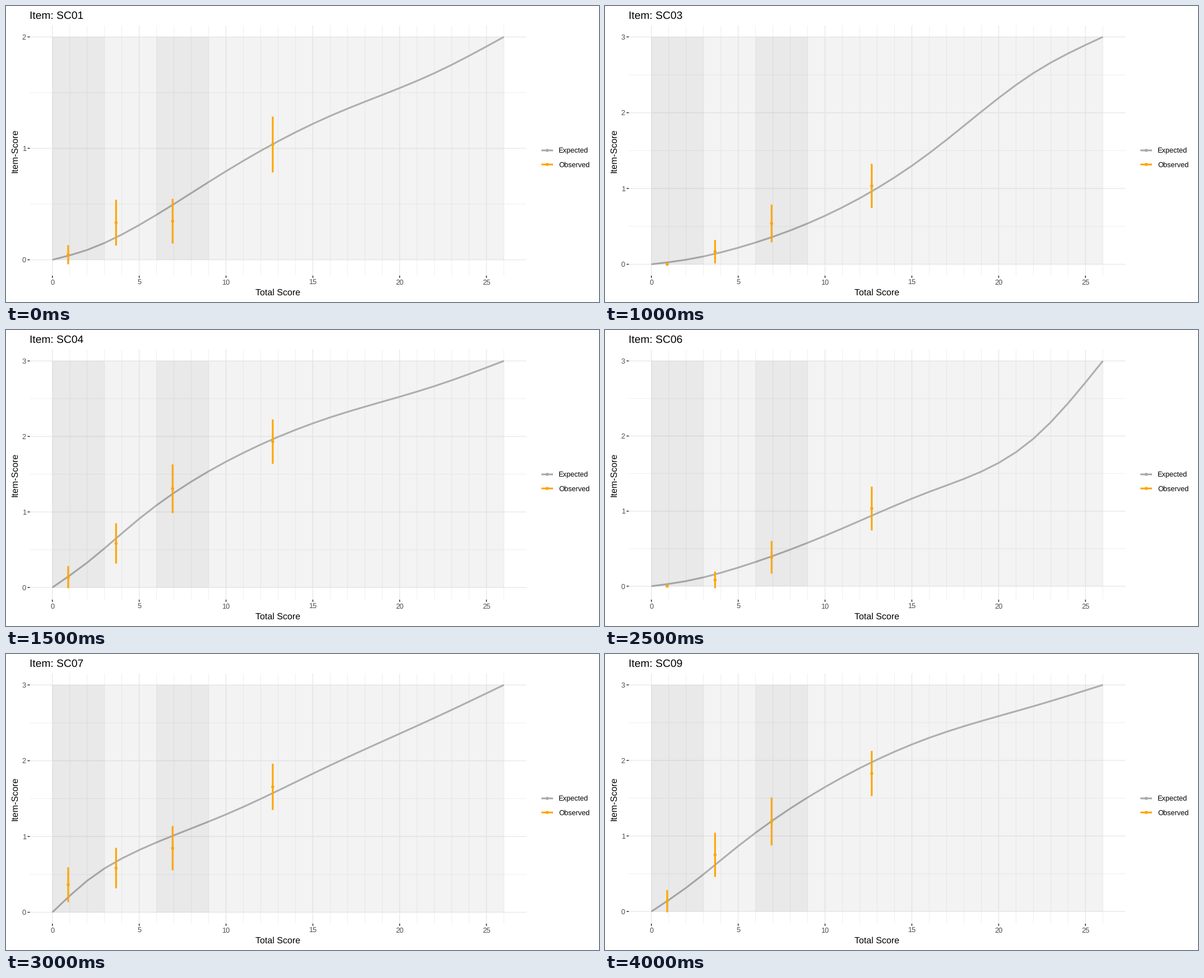
These frames come from a looping animation (1058 by 529 pixels, 4.5 s). A matplotlib script:

```python
import matplotlib.pyplot as plt
import numpy as np
from matplotlib.animation import FuncAnimation
from matplotlib.patches import Circle, Rectangle

W, H, DPI = 1058, 529, 64
PT = 72 / DPI  # points per pixel
LEFT, RIGHT, TOP, BOTTOM = 42.5, 928.5, 35.0, 481.9
MAX_TOTAL = 26
GREY, ORANGE, GRID = "#A9A9A9", "#FFA500", "#EBEBEB"

plt.rcParams.update({"font.family": "Liberation Sans", "path.snap": False,
                     "text.hinting": "none"})

# Expected item score at a few key totals; a smooth curve joins them
KEYS = np.array([0, 2, 5, 10, 16, 22, MAX_TOTAL])
EXPECTED = {
    1: [0, .088, .312, .795, 1.291, 1.675, 2],
    2: [0, .604, 1.187, 2.007, 2.563, 2.842, 3],
    4: [0, .329, .910, 1.666, 2.253, 2.666, 3],
    6: [0, .068, .248, .672, 1.257, 1.964, 3],
    7: [0, .416, .822, 1.291, 1.939, 2.565, 3],
    9: [0, .314, .866, 1.648, 2.300, 2.718, 3],
}

# Four score groups: number of people, mean total, and summed score per item
BANDS = [0, 3, 6, 9, MAX_TOTAL]
SIZES = np.array([22, 24, 26, 29])
GROUP_X = np.array([20, 88, 180, 368]) / SIZES
SUMS = [[1, 8, 9, 30], [5, 25, 39, 65], [0, 4, 14, 30],
        [3, 14, 34, 56], [0, 2, 10, 28], [0, 2, 10, 30],
        [8, 14, 22, 48], [0, 1, 11, 28], [3, 18, 31, 53]]


def spline(x, y, at):
    """Natural cubic spline through (x, y), evaluated at the given points."""
    h = np.diff(x)
    slope = np.diff(y) / h
    last = len(x) - 1
    a, b = np.eye(last + 1), np.zeros(last + 1)
    for i in range(1, last):
        a[i, i - 1:i + 2] = h[i - 1], 2 * (h[i - 1] + h[i]), h[i]
        b[i] = slope[i] - slope[i - 1]
    m = np.linalg.solve(a, b)
    k = np.clip(np.searchsorted(x, at, side="right") - 1, 0, last - 1)
    t, u = at - x[k], x[k + 1] - at
    return (np.interp(at, x, y)
            + (m[k] * u * (u**2 - h[k]**2) + m[k + 1] * t * (t**2 - h[k]**2)) / h[k])


SCORES = np.arange(MAX_TOTAL + 1)
CURVES = {i: spline(KEYS, v, SCORES) for i, v in EXPECTED.items()}
# Item scores add up to the total, so the other items share what is left
rest = (SCORES - sum(CURVES.values())) / (len(SUMS) - len(CURVES))

fig = plt.figure(figsize=(W / DPI, H / DPI), dpi=DPI, facecolor="white")
ax = fig.add_axes([0, 0, 1, 1])


def px(score):
    return LEFT + (RIGHT - LEFT) * (score / MAX_TOTAL + .05) / 1.1


def line(x, y, color, width, z):
    ax.plot(x, y, color=color, lw=width * PT, zorder=z,
            solid_capstyle="butt", solid_joinstyle="round")


def grid_line(x, y, major):
    line(x, y, GRID, 1.55 if major else .78, 2 if major else 1)


def tick(x, y):
    line(x, y, "#333333", 1.55, 2)


def dot(x, y, color):
    ax.add_patch(Circle((x, y), 2.8, fc=color, lw=0, zorder=6))


def label(x, y, text, size, color="black", **kw):
    ax.text(x, y, text, fontsize=size * PT, color=color, va="baseline",
            rotation_mode="anchor", zorder=8, **kw)


def draw_x_axis():
    for s in SCORES:
        x, major = px(s), s % 5 == 0
        grid_line([x, x], [TOP, BOTTOM], major)
        if major:
            tick([x, x], [BOTTOM, BOTTOM + 4])
            label(x, 498.2, str(s), 12.8, "#4D4D4D", ha="center")
    label((LEFT + RIGHT) / 2, 517, "Total Score", 16, ha="center")


def draw_y_axis(py, top):
    for half in range(2 * top + 1):
        y, major = py(half / 2), half % 2 == 0
        grid_line([LEFT, RIGHT], [y, y], major)
        if major:
            tick([LEFT - 4, LEFT], [y, y])
            label(35.7, y + 4.6, str(half // 2), 12.8, "#4D4D4D", ha="right")
    label(20.2, (TOP + BOTTOM) / 2, "Item-Score", 16, rotation=90, ha="center")


def draw_legend():
    for y, name, color in ((258, "Expected", GREY), (283.2, "Observed", ORANGE)):
        line([955.2, 976], [y, y], color, 3.1, 5)
        dot(965.6, y, color)
        label(986.2, y + 4.5, name, 12.8)


def draw(frame):
    item = frame + 1
    curve = CURVES.get(item, rest)
    top = round(curve[-1])
    mean = np.array(SUMS[frame]) / SIZES
    # 95% interval, with a spread that shrinks towards the lowest and highest score
    half = 1.96 * np.sqrt(.95 * mean * (1 - mean / top) / SIZES)
    low = min(0, (mean - half).min())

    def py(v):
        return BOTTOM - (BOTTOM - TOP) * ((v - low) / (top - low) + .05) / 1.1

    ax.cla()
    ax.axis("off")
    ax.set_xlim(0, W)
    ax.set_ylim(H, 0)

    draw_x_axis()
    draw_y_axis(py, int(top))
    line(px(SCORES), py(curve), GREY, 3.1, 3)
    for i, (a, b) in enumerate(zip(BANDS, BANDS[1:])):
        ax.add_patch(Rectangle((px(a), py(top)), px(b) - px(a), py(0) - py(top),
                               fc="#C3C3C3" if i % 2 else "#919191",
                               alpha=.2, lw=0, zorder=4))
    for x, m, h in zip(px(GROUP_X), mean, half):
        line([x, x], [py(m - h), py(m + h)], ORANGE, 3.1, 5)
        dot(x, py(m), ORANGE)
    draw_legend()
    label(LEFT, 22.6, f"Item: SC{item:02d}", 19.2)
    return []


anim = FuncAnimation(fig, draw, frames=len(SUMS), interval=500,
                     init_func=lambda: [], repeat=True, repeat_delay=0, blit=False)
plt.show()
```
